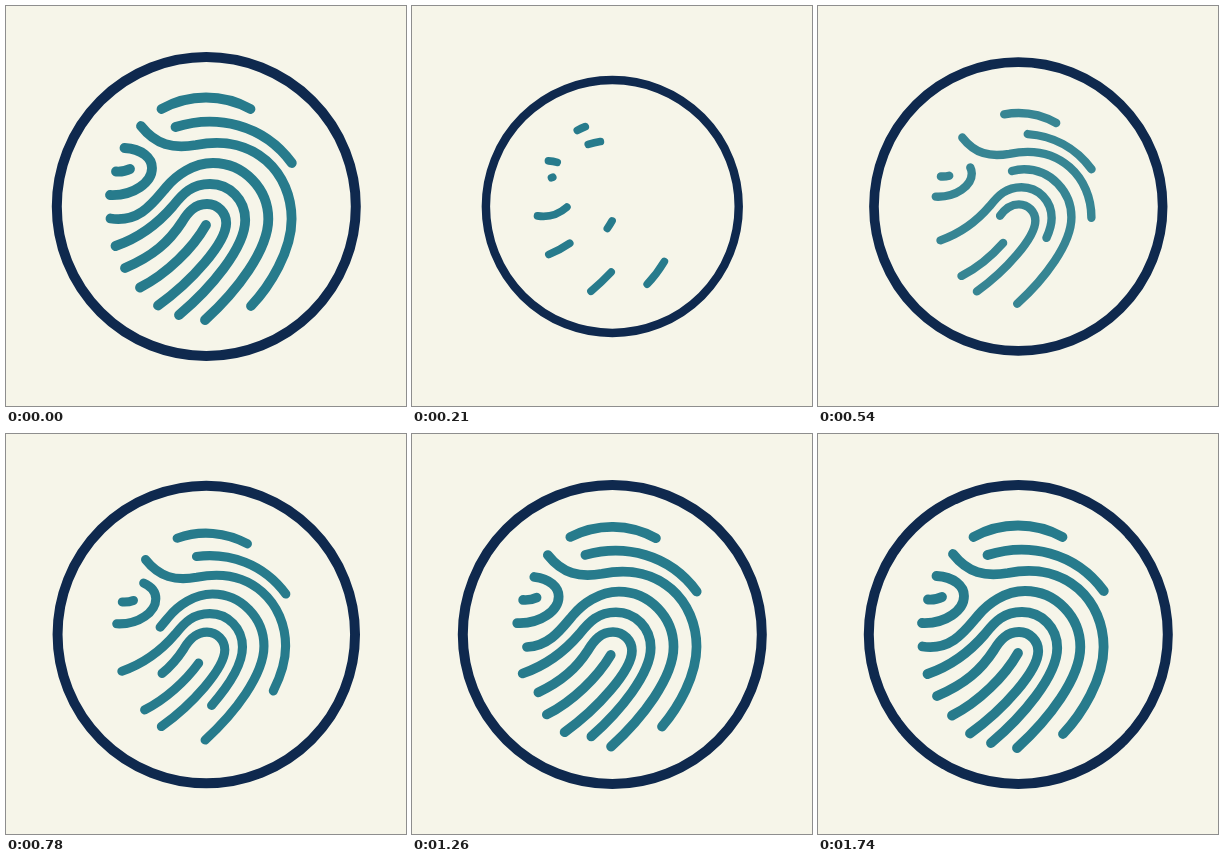
These frames come from a looping animation (400 by 400 pixels, 1800 ms). An HTML page:

```html
<!DOCTYPE html>
<html>
<head>
<meta charset="utf-8">
<title>Fingerprint</title>
<style>
html, body { margin: 0; height: 100%; overflow: hidden; background: #f6f5e9; }
svg { display: block; width: 100vw; height: 100vh; fill: none; }
#ring { stroke: #0f294e; stroke-width: 10; }
#print { stroke: #277b8c; stroke-width: 9.8; stroke-linecap: round; }
#print path { stroke-dasharray: 1 1; }
</style>
</head>
<body>
<svg viewBox="0 0 400 400">
  <circle id="ring" cx="200.3" cy="200.5" r="149.5"/>
  <g id="print">
    <g id="forward">
      <path pathLength="1" d="M135 120C150 139 167 143 190 139C250 127 285.6 168 285.6 213C285.6 245 264 280 245 300"/>
      <path pathLength="1" d="M110 165.5Q118 166 124 163"/>
      <path pathLength="1" d="M109.5 240C135.5 231 152.5 217 167 200C177 187.5 186 178 204 178C224 178 239.2 194 239.2 214C239.2 242 204 283 173 309"/>
    </g>
    <g id="backward">
      <path pathLength="1" d="M155.5 103A92 92 0 0 1 244.5 103"/>
      <path pathLength="1" d="M169.5 121C210 108.3 257 117.7 285.8 157"/>
      <path pathLength="1" d="M118.5 142C136 143 146 152 146 162C146 176 128 190 104 189"/>
      <path pathLength="1" d="M104.5 212.5C133 217 147 197 160 181.5C170 169.5 187 157 207 157C238 157 262.3 183 262.3 213C262.3 244 231 285 199 314"/>
      <path pathLength="1" d="M119 262C147 250 163 236 176 216C182 206 189 198 201 198C212 198 220.2 207 220.2 217C220.2 237 185 276 152 299.5"/>
      <path pathLength="1" d="M200 219C187 242 161 268 134 281.5"/>
    </g>
  </g>
</svg>
<script>
const LOOP = 1800, STEP = 30, END = 1740;
const [ring, print, forward, backward] =
  ['ring', 'print', 'forward', 'backward'].map(id => document.getElementById(id));

const clamp = x => Math.min(1, Math.max(0, x));

function bezier(x1, y1, x2, y2) {
  const at = (a, b, s) => 3 * a * s * (1 - s) ** 2 + 3 * b * s * s * (1 - s) + s ** 3;
  return x => {
    let lo = 0, hi = 1;
    for (let i = 0; i < 30; i++) {
      const mid = (lo + hi) / 2;
      if (at(x1, x2, mid) < x) lo = mid; else hi = mid;
    }
    return at(y1, y2, hi);
  };
}

const flow = bezier(.225, .56, 0, 1);

// Shrinks smoothly until low, then grows back with a cubic ease-out
function ringScale(t, low = 200, end = 1050) {
  const x = clamp(t / low);
  const amount = t < low ? x * x * (3 - 2 * x) : clamp((end - t) / (end - low)) ** 3;
  return 1 - .16 * amount;
}

const scale = (el, s) =>
  el.setAttribute('transform', `translate(200.3 200.5) scale(${s}) translate(-200.3 -200.5)`);

function draw(now) {
  const t = Math.min(END, Math.floor(now % LOOP / STEP) * STEP);
  // Each line slides off one end, then re-enters from the other
  const q = t < END ? 2 * flow(t / END) : 0;
  scale(ring, ringScale(t));
  scale(print, 1 - Math.min(.25 * q, .44 * (2 - q)));
  forward.style.strokeDashoffset = -q;
  backward.style.strokeDashoffset = q;
  print.style.opacity = q < 1 ? 1 : clamp((t - 210) / 360);
  requestAnimationFrame(() => draw(performance.now()));
}
draw(performance.now());
</script>
</body>
</html>
```
